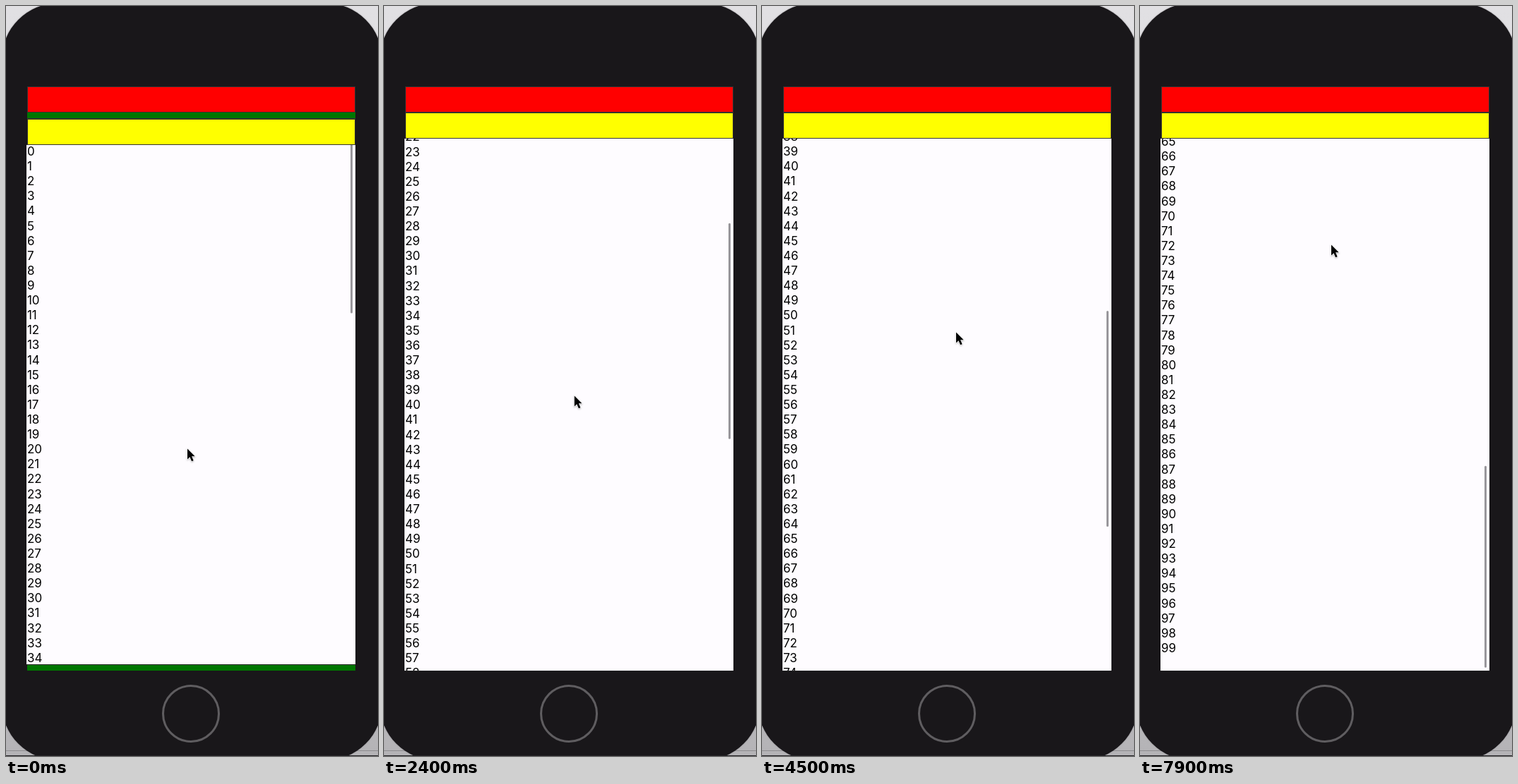
Animation, 527 px wide and 1063 px high, one loop 8 s. Source, as an HTML page:

```html
<!DOCTYPE html>
<html lang="en">
<head>
<meta charset="utf-8">
<title>Collapsing header list</title>
<style>
html, body { margin: 0; width: 100%; height: 100%; overflow: hidden; }
body { position: relative; background: linear-gradient(#e1e0e3, #dad9dc 50%, #b4b3b6); }
div, svg { position: absolute; box-sizing: border-box; }
.rule { left: 0; width: 527px; height: 1px; }
.phone {
  left: -6px; top: -4px; width: 539px; height: 1073px;
  border-radius: 80px; background: #19171a; box-shadow: 0 0 2px #8f8d91;
}
.home {
  left: 221px; top: 962px; width: 82px; height: 82px;
  border: 3.5px solid #5f5d60; border-radius: 50%;
}
.green { left: 30px; top: 151px; width: 465px; height: 791px; background: #007600; }
.bar { left: 30px; width: 465px; border: 1px solid #353331; }
#red { top: 114px; height: 37px; background: #f00; }
#yellow { top: 150px; height: 38px; border-top-width: 2px; background: #ff0; }
#view {
  left: 29px; width: 466px; overflow: hidden;
  background: #fefcff; border-bottom: 1px solid #222;
}
#list { left: 1px; top: 0; font: 17px/21.12px Inter, sans-serif; letter-spacing: -.1px; color: #000; }
#list div { position: static; height: 21.12px; }
#thumb { left: 459px; top: 0; width: 3px; border-radius: 1.5px; background: #99979b; }
#cursor { left: 0; top: 0; overflow: visible; filter: drop-shadow(0 1px 1px #0004); }
</style>
</head>
<body>
<div class="rule" style="top:1055px;background:#8d8c8f"></div>
<div class="phone"></div>
<div class="rule" style="top:1062px;background:#242326"></div>
<div class="home"></div>
<div class="green"></div>
<div class="bar" id="red"></div>
<div id="view"><div id="list"></div><div id="thumb"></div></div>
<div class="bar" id="yellow"></div>
<svg id="cursor" width="14" height="22">
  <path transform="scale(.92)" d="M0 0V16.2L3.7 12.8L6.6 19.4L9.4 18.2L6.6 11.8H11.6Z" fill="#000" stroke="#fff" stroke-width="1.2" paint-order="stroke"/>
</svg>
<script>
const LOOP = 8000, STEP = 100;
const TOP = 188, BOTTOM = 943, ROW = 21.12;
const MAX_GAP = 20.5, SCROLL_END = -1159.4;

// Turning points of the swipes: time, centre of the first row, pointer x and y
const turns = [
  [0, 206.5, 257, 627],
  [1400, -211.3, 266, 639],
  [2900, -300.9, 271, 554],
  [3200, -283.4, 272, 571],
  [4500, -616.7, 275, 462],
  [5000, -622.2, 277, 462],
  [5600, -610.7, 281, 471],
  [6600, -679.5, 282, 414],
  [6800, -659, 282, 434],
  [7900, -1179.8, 271, 338]
];

const $ = id => document.getElementById(id);
const clamp = (v, lo, hi) => Math.min(hi, Math.max(lo, v));

// Rows ease between turns; on a long swipe the pointer runs ahead and comes back.
function poseAt(t) {
  const i = Math.max(1, turns.findIndex(p => p[0] >= t));
  const a = turns[i - 1], b = turns[i];
  const u = (t - a[0]) / (b[0] - a[0]);
  const e = (1 - Math.cos(Math.PI * u)) / 2;
  const [, y, px, py] = a.map((v, k) => v + (b[k] - v) * e);
  const lead = 0.3 * (b[1] - a[1]) * Math.sin(Math.PI * u);
  return { y, px, py: py + lead };
}

// The gap above the yellow bar follows the scroll, held between 0 and MAX_GAP.
const poses = [];
for (let t = 0, gap = 9; t < LOOP; t += STEP) {
  const p = poseAt(t);
  if (t) gap = clamp(gap + p.y - poses.at(-1).y, 0, MAX_GAP);
  poses.push({ ...p, gap });
}

for (let i = 0; i < 100; i++) {
  const row = document.createElement('div');
  row.textContent = i;
  $('list').append(row);
}

const move = (id, x, y) => $(id).style.transform = `translate(${x}px, ${y}px)`;

function draw({ y, px, py, gap }) {
  const top = Math.round(TOP + gap);
  $('view').style.top = top + 'px';
  $('view').style.height = Math.round(BOTTOM - gap) - top + 'px';
  move('yellow', 0, top - TOP);
  move('list', 0, y - ROW / 2 - top);
  const over = Math.max(0, SCROLL_END - y);
  $('thumb').style.height = 306 - over + 'px';
  move('thumb', 0, 283 - 0.3675 * (y + over + 211.3) + over - top);
  move('cursor', px, py + 0.5);
}

const start = performance.now();
function tick() {
  const t = (performance.now() - start) % LOOP;
  draw(poses[Math.floor(t / STEP)]);
  requestAnimationFrame(tick);
}
tick();
</script>
</body>
</html>
```
